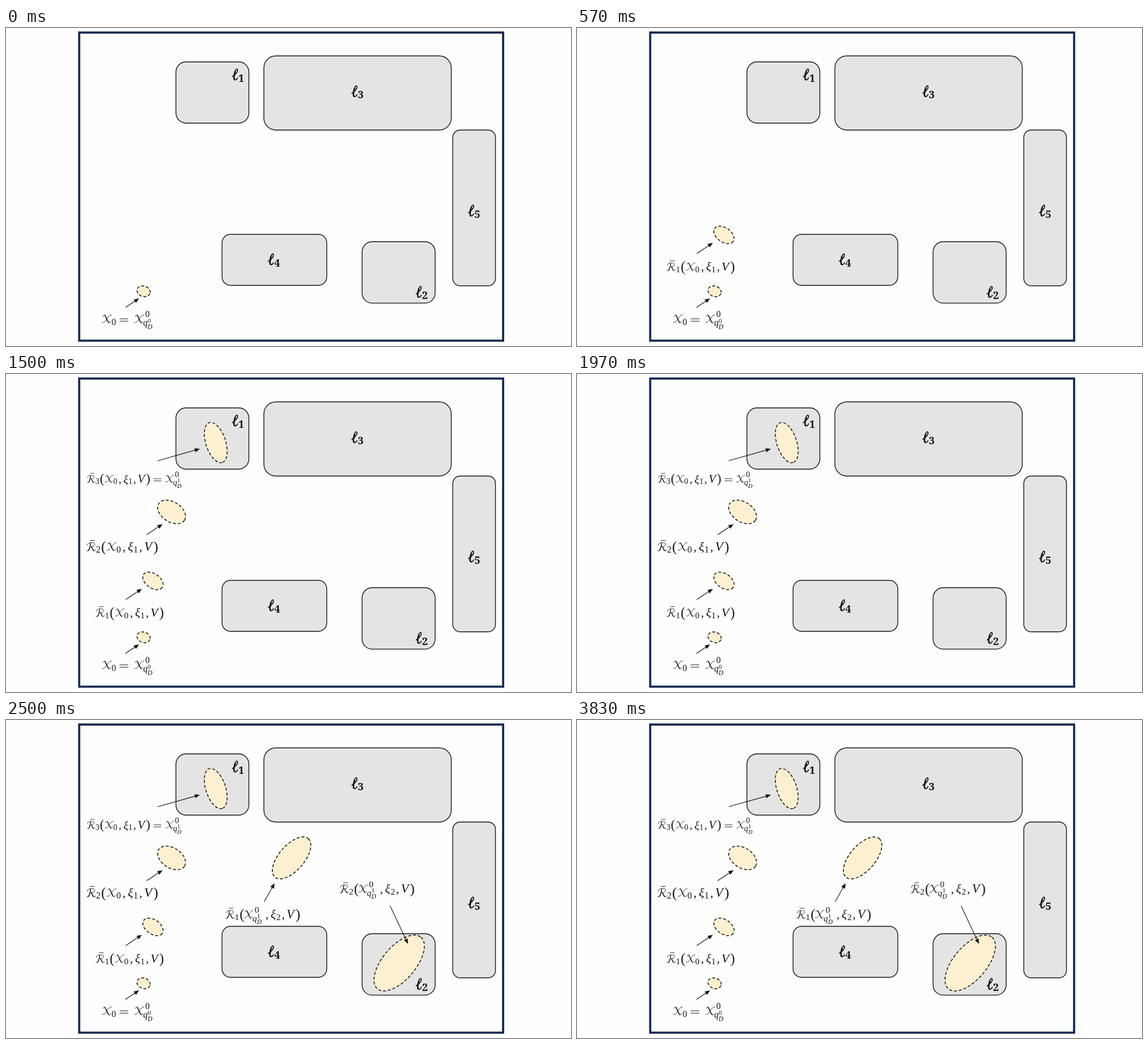
An HTML page that plays this animation: 998 px wide and 561 px high, repeating every 4000 ms.

```html
<!DOCTYPE html>
<html lang="en">
<head>
<meta charset="utf-8">
<title>Reachable sets</title>
<style>
html, body { margin: 0; width: 100%; height: 100%; overflow: hidden; background: #fefefe; }
svg { display: block; width: 100vw; height: 100vh; }
.room { fill: none; stroke: #172b52; stroke-width: 3.8; }
.box { fill: #e4e4e4; stroke: #151515; stroke-width: 1.4; }
.set { fill: #fdf0d0; stroke: #111; stroke-width: 1.5; stroke-dasharray: 5.2 3.3; }
.arrow { stroke: #111; stroke-width: 1.1; fill: #111; }
.math { font-family: "Liberation Serif", "Times New Roman", serif; fill: #151515; }
.math .it { font-style: italic; }
.ink { fill: none; stroke: #151515; stroke-linecap: round; stroke-linejoin: round; }
.num { font: bold 18px "Noto Serif", "Liberation Serif", serif; fill: #111; }
.step { opacity: 0; animation: 4s step-end infinite; }
.s1 { animation-name: s1; }
.s2 { animation-name: s2; }
.s3 { animation-name: s3; }
.s4 { animation-name: s4; }
.s5 { animation-name: s5; }
@keyframes s1 { 0% { opacity: 0 } 12.5%, 100% { opacity: 1 } }
@keyframes s2 { 0% { opacity: 0 } 25%, 100% { opacity: 1 } }
@keyframes s3 { 0% { opacity: 0 } 37.5%, 100% { opacity: 1 } }
@keyframes s4 { 0% { opacity: 0 } 50%, 100% { opacity: 1 } }
@keyframes s5 { 0% { opacity: 0 } 62.5%, 100% { opacity: 1 } }
</style>
</head>
<body>
<svg id="stage" viewBox="0 0 998 561" preserveAspectRatio="none">
  <defs>
    <!-- calligraphic letters, 100 units per em -->
    <g id="X" class="ink">
      <path stroke-width="7.5" d="M25 -63 C35 -56 44 -14 58 -3"/>
      <path stroke-width="4" d="M11 -54 C14 -64 20 -68 26 -63 M58 -3 C63 1 70 -3 73 -11 M80 -64 C70 -70 60 -58 49 -43 C36 -25 22 2 5 -5"/>
    </g>
    <g id="R" class="ink">
      <path stroke-width="7" d="M38 -61 C36 -38 30 -14 20 -2 M45 -33 C53 -20 55 -6 64 -1"/>
      <path stroke-width="4" d="M20 -2 C15 2 8 1 6 -3 M11 -44 C9 -60 27 -66 48 -66 C66 -66 73 -60 71 -51 C69 -41 56 -34 40 -32 M64 -1 C70 2 77 -2 80 -8 M34 -84 H70"/>
    </g>
    <g id="ell" class="ink">
      <path stroke-width="1.7" d="M.8 -6.8 C4 -8.6 10.2 -14 10 -18.2 C9.8 -21.4 7 -20.4 5.5 -15.5 C3.6 -9.5 2.4 -1.2 5.4 -.8 C7.4 -.7 9 -2.4 10.2 -4.6"/>
      <path stroke-width="2.7" d="M5.6 -15.5 C4 -10 3 -4 4.6 -1.8"/>
    </g>
  </defs>
</svg>
<script>
const glyph = (ch, x, y = 0, size = 100, cls = '') =>
  `<text x="${x}" y="${y}" font-size="${size}" class="${cls}">${ch}</text>`;
const use = (id, x, y = 0) => `<use href="#${id}" x="${x}" y="${y}"/>`;
const sub = (ch, x) => glyph(ch, x, 15, 72);
const paren = (ch, x) => glyph(ch, x, 4, 117);
const equals = x => `<path class="ink" stroke-width="4.5" d="M${x} -34 h67 m-67 19 h67"/>`;

const x0 = x => use('X', x) + sub('0', x + 80);
const xq = (x, n) => use('X', x) + glyph('0', x + 91, -48, 72) +
  glyph('q', x + 74, 22, 72, 'it') + glyph(n, x + 111, -3, 52) +
  glyph('D', x + 110, 47, 54, 'it');

// reach set: index k, state drawn by inner, tail position, index of xi
const reach = (k, inner, tail, i) =>
  use('R', 0) + sub(k, 82) + paren('(', 123) + inner +
  glyph(',', tail) + glyph('ξ', tail + 43, 0, 100, 'it') + sub(i, tail + 89) +
  glyph(',', tail + 134) + glyph('V', tail + 174, 0, 104, 'it') + paren(')', tail + 248);

const label = (x, y, em, body) =>
  `<g class="math" transform="translate(${x} ${y}) scale(${em / 100})">${body}</g>`;

const box = (x, y, w, h, r) =>
  `<rect class="box" x="${x}" y="${y}" width="${w}" height="${h}" rx="${r}"/>`;

const ell = (n, x, y) =>
  use('ell', x, y) + `<text class="num" x="${x + 11.6}" y="${y + 2}">${n}</text>`;

const oval = (x, y, a, b, turn) =>
  `<ellipse class="set" rx="${a}" ry="${b}" transform="translate(${x} ${y}) rotate(${turn})"/>`;

function arrow(x1, y1, x2, y2) {
  const turn = Math.atan2(y2 - y1, x2 - x1) * 180 / Math.PI;
  const len = Math.hypot(x2 - x1, y2 - y1);
  return `<g class="arrow" transform="translate(${x1} ${y1}) rotate(${turn})">
    <path d="M0 0 H${len - 6}"/>
    <path stroke="none" d="M${len} 0 l-9 -3.7 v7.4 z"/></g>`;
}

const step = (n, ...parts) => `<g class="step s${n}">${parts.join('')}</g>`;

const scene = [
  '<rect class="room" x="129.3" y="8" width="748.8" height="543.6"/>',
  box(300.2, 59.8, 128.8, 108, 18),
  box(455.5, 49.3, 331, 130.7, 21),
  box(789.2, 180, 75.4, 274.8, 13),
  box(381.6, 364, 185, 90, 15),
  box(629, 377, 129, 108.4, 18),

  oval(243, 464.5, 12, 9.2, 20),
  arrow(211, 493, 235, 477),
  label(169, 520.5, 21.8, x0(0) + equals(147) + xq(262, '0')),

  step(1, oval(259.6, 365, 20.1, 12.6, 35), arrow(211.5, 398, 240, 379),
    label(157.5, 428, 20.9, reach('1', x0(165), 294, '1'))),
  step(2, oval(292.5, 243.3, 27.1, 17.6, 33), arrow(248.5, 283.5, 276.5, 265),
    label(141, 312, 22, reach('2', x0(165), 294, '1'))),
  step(3, oval(370.5, 121, 36.9, 17.5, 72), arrow(268, 153, 342.5, 132),
    label(142, 191.5, 19.4, reach('3', x0(165), 294, '1') + equals(614) + xq(716, '1'))),
  step(4, oval(504.5, 243.3, 45, 22.3, -49), arrow(456, 320.5, 474.5, 288),
    label(386.5, 350, 21.4, reach('1', xq(155, '1'), 336, '2'))),
  step(5, oval(694.5, 428.7, 59.6, 29.3, -49.8), arrow(678.5, 328, 710, 395),
    label(588.5, 305, 21.4, reach('2', xq(155, '1'), 336, '2'))),

  ell(1, 399, 92.5),
  ell(2, 723.5, 476),
  ell(3, 610, 122),
  ell(4, 462.5, 418.5),
  ell(5, 816, 332.5)
];

document.getElementById('stage').insertAdjacentHTML('beforeend', scene.join(''));
</script>
</body>
</html>
```
